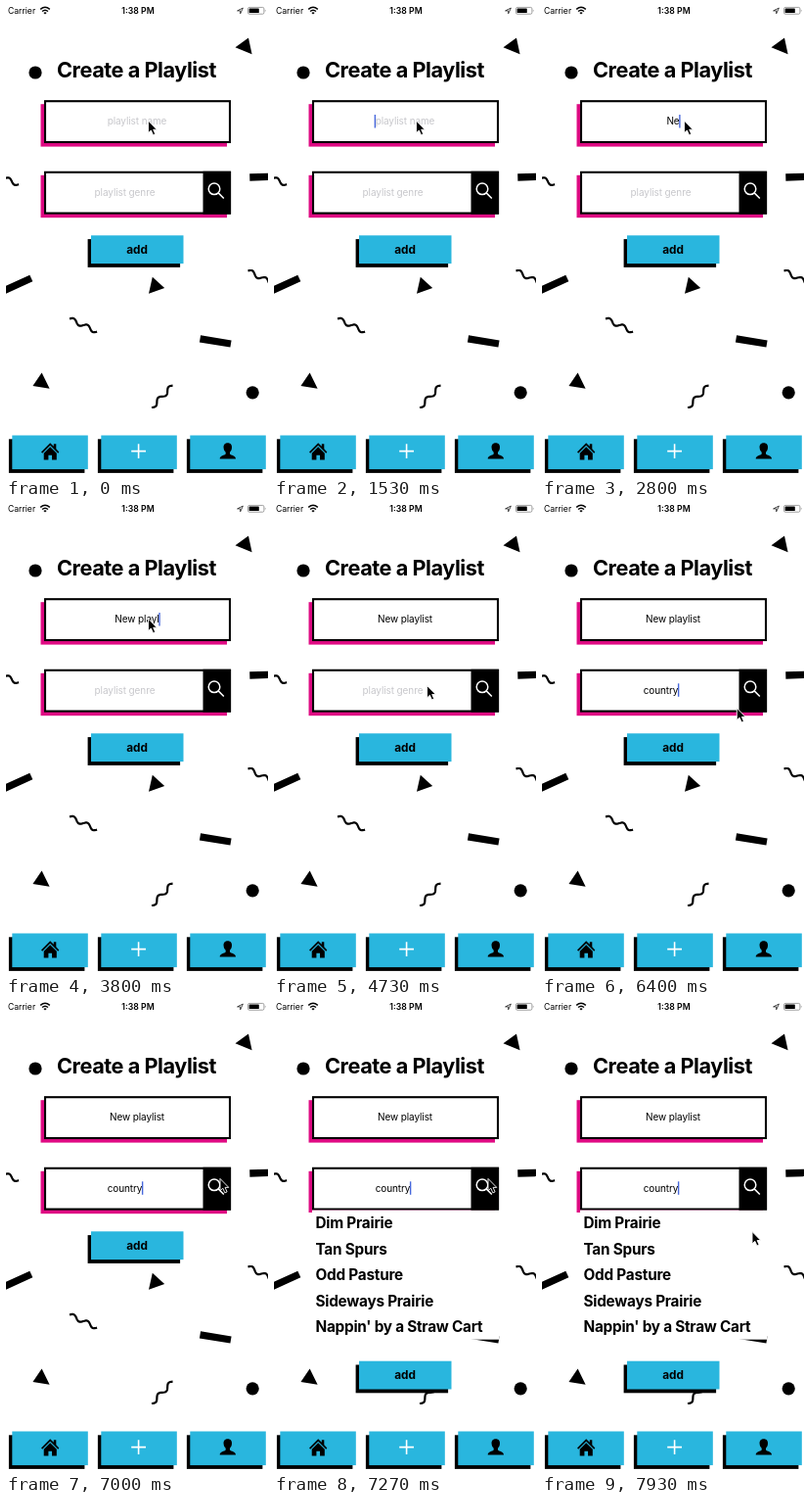
Recreate the animation shown at these times as an HTML page. Size 268 by 480 pixels, loop 8000 ms.

```html
<!DOCTYPE html>
<html lang="en">
<head>
<meta charset="utf-8">
<title>Create a Playlist</title>
<style>
  html, body { margin: 0; width: 100%; height: 100%; overflow: hidden; background: #fff; }
  svg { display: block; width: 100%; height: 100%; }
  text { font-family: Inter, "Liberation Sans", sans-serif; }
  .mid { text-anchor: middle; }
  .title { font-size: 21.7px; font-weight: 700; letter-spacing: -.021em; }
  .field { font-size: 10px; letter-spacing: -.01em; text-anchor: middle; }
  .list { font-size: 15.3px; font-weight: 700; letter-spacing: -.015em; }
  .line { fill: none; stroke: #000; stroke-width: 2.2; }
  .caret { fill: #4868dc; }
  .cyan { fill: #29b6de; }
  .pink { fill: #df0a83; }
  .box { fill: #fff; stroke: #000; stroke-width: 2.1; }
</style>
</head>
<body>
<svg viewBox="0 0 268 480">
  <g id="status">
    <text x="2" y="7.7" font-size="8.6">Carrier</text>
    <path d="M35.2 3.4q4.8-4.2 9.6 0M37 5.5q3-2.6 6 0" fill="none" stroke="#000" stroke-width="1.4"/>
    <path d="M38.4 6.9q1.6-1.3 3.2 0L40 8.6Z"/>
    <text class="mid" x="135" y="7.8" font-size="8.7" font-weight="600">1:38 PM</text>
    <path d="M236.6 4.9L242.4 2L239.7 7.8V4.9Z" fill="none" stroke="#000" stroke-width=".7"/>
    <rect x="247.5" y="1.4" width="16.4" height="6.8" rx="1.4" fill="none" stroke="#777" stroke-width=".7"/>
    <rect x="248.6" y="2.5" width="10.2" height="4.6" rx=".6"/>
    <path d="M264.9 3.6q1.3 1.2 0 2.4Z" fill="#777"/>
  </g>

  <g id="confetti">
    <circle cx="30" cy="68" r="6.6"/>
    <circle cx="252.2" cy="394.8" r="6.6"/>
    <path d="M234.5 42.3L248 32.5L251.6 49.3ZM149.8 276.8L162.2 288L146 293.8ZM36.6 374.5L44.6 390.7L27.4 388Z"/>
    <path d="M-5 292L25.8 278M249.3 175L270 174.4M198.5 339.8L230 345" stroke="#000" stroke-width="7.3"/>
    <g id="squiggles"></g>
  </g>

  <text class="title mid" x="133.5" y="72.7">Create a Playlist</text>

  <g id="inputs"></g>
  <rect id="panel" x="35" y="215" width="195.5" height="129.7" fill="#fff"/>
  <rect id="shade" x="39" y="212.6" width="191.5" height="4" fill="#fff"/>
  <rect x="201.5" y="168.8" width="28.6" height="43.8"/>
  <path d="M217.2 190.9L222.8 196.5M218.8 186.8a5.8 5.8 0 1 0-11.6 0a5.8 5.8 0 1 0 11.6 0" fill="none" stroke="#fff" stroke-width="1.5"/>

  <g id="list" class="list"></g>
  <g id="add"></g>
  <g id="tabs"></g>
  <g id="icons">
    <path d="M36 455.6L45.2 446.3L48.8 449.8V447.3H51.3V452.3L54.3 455.6L53.2 456.7L45.2 448.7L37.2 456.7ZM38.7 456.8L45.2 450.2L51.8 456.8V463.6H47V458.8H43.4V463.6H38.7Z"/>
    <path d="M128.2 454.6H143M135.6 447.2V462" stroke="#fff" stroke-width="1.6"/>
    <path d="M226.8 446.3C230 446.3 231.3 448.5 231 451.3C230.8 453.5 230 454.6 229 455.8V457.5C230 458.9 235 459 235 462.5H218.7C218.7 459 223.7 458.9 224.7 457.5V455.8C223.6 454.6 222.8 453.5 222.6 451.3C222.3 448.5 223.6 446.3 226.8 446.3Z"/>
  </g>

  <text class="field" id="nameText" y="121.2"></text>
  <rect class="caret" id="nameCaret" y="111" width="1.4" height="13.5"/>
  <text class="field" id="genreText" y="193.8"></text>
  <rect class="caret" id="genreCaret" y="183.3" width="1.4" height="13.5"/>

  <path id="cursor" d="M0 0V12.4L2.8 9.8L4.9 14.5L7.1 13.5L5.1 9H8.8Z" stroke="#fff" stroke-width=".9"/>
</svg>

<script>
const LOOP = 8000;
const LIST_OPEN = 7070;
const LIST_SHIFT = 132.4;
const KEY_GAP = 65;
const SPACE = 2.8;
const BLINK = { period: 950, hold: 540, fade: 200 };

const $ = id => document.getElementById(id);
const clamp = v => Math.min(1, Math.max(0, v));
const rect = (cls, x, y, w, h) =>
  `<rect class="${cls}" x="${x}" y="${y}" width="${w}" height="${h}"/>`;

// Cyan block with a black shadow to the lower left
const raised = (x, y, w, h) => rect("", x - 3.4, y + 3.8, w, h) + rect("cyan", x, y, w, h);

const input = y => rect("pink", 35.5, y + 3, 190.5, 43.4) + rect("box", 40, y, 189, 41.8);

// Two sine periods along a tilted axis
function squiggle(x, y, angle, amplitude) {
  const points = Array.from({ length: 33 }, (_, i) =>
    `${i * 31 / 32} ${-amplitude * Math.sin(i * Math.PI / 8)}`);
  return `<path class="line" transform="translate(${x} ${y}) rotate(${angle})" d="M${points.join("L")}"/>`;
}

const songs = ["Dim Prairie", "Tan Spurs", "Odd Pasture", "Sideways Prairie", "Nappin' by a Straw Cart"];
$("list").innerHTML = songs.map((s, i) => `<text x="42.5" y="${231.3 + 26.4 * i}">${s}</text>`).join("");
$("squiggles").innerHTML = squiggle(65, 319.5, 25, 2.2) + squiggle(-15.5, 170, 23, 2.2) +
  squiggle(247.5, 270.5, 27, 2.2) + squiggle(149, 410, -46, -2.2);
$("inputs").innerHTML = [97.2, 169.8].map(input).join("");
$("tabs").innerHTML = [0, 1, 2].map(i => raised(6.3 + 91 * i, 438.5, 77.5, 34.6)).join("");
$("add").innerHTML = raised(87, 234.3, 94.5, 28.8) +
  `<text class="mid" x="134" y="252.9" font-size="11.8" font-weight="700">add</text>`;

// Typing comes in bursts of evenly spaced keys
const fields = [
  {
    id: "name", center: 134, hint: "playlist name", focus: 1530, blur: 4500,
    bursts: [[2730, "New"], [3070, " "], [3270, "pl"], [3670, "aylist"]]
  },
  {
    id: "genre", center: 121.5, hint: "playlist genre", focus: 5070, blur: LOOP,
    bursts: [[5600, "c"], [5800, "ou"], [6070, "nt"], [6270, "ry"]]
  }
];

const home = [145.6, 117.2];
const moves = [
  { from: 4400, to: 4870, bend: [155, 155], end: [157, 192] },
  { from: 6330, to: 6800, bend: [250, 235], end: [219, 180.4] },
  { from: 7470, to: 7930, bend: [252, 216], end: [215, 234.5] }
];

function typedAt(bursts, t) {
  return bursts.map(([start, text]) =>
    t < start ? "" : text.slice(0, 1 + Math.floor((t - start) / KEY_GAP))).join("");
}

function caretOpacity({ focus, blur, bursts }, t) {
  if (t < focus || t >= blur) return 0;
  if (bursts.some(([start]) => t >= start && t < start + 400)) return 1;
  const phase = (t - focus) % BLINK.period;
  return 1 - clamp((phase - BLINK.hold) / BLINK.fade);
}

function drawField(field, t) {
  const { id, center, hint, bursts } = field;
  const raw = typedAt(bursts, t);
  const shown = raw.trimEnd();
  const text = $(id + "Text"), caret = $(id + "Caret");
  text.textContent = shown || hint;
  text.setAttribute("x", center);
  text.setAttribute("fill", shown ? "#000" : "#c7c7cb");
  const half = text.getComputedTextLength() / 2;
  const edge = shown ? half + (raw.length - shown.length) * SPACE : -half - .6;
  caret.setAttribute("x", center + edge - .4);
  caret.setAttribute("opacity", caretOpacity(field, t));
}

// Each move follows a quadratic curve and slows towards its end
function cursorAt(t) {
  return moves.reduce((start, { from, to, bend, end }) => {
    const k = 1 - (1 - clamp((t - from) / (to - from))) ** 2;
    return start.map((v, i) => (1 - k) ** 2 * v + 2 * k * (1 - k) * bend[i] + k * k * end[i]);
  }, home);
}

function draw(t) {
  const open = t >= LIST_OPEN;
  fields.forEach(field => drawField(field, t));
  for (const id of ["panel", "shade", "list"]) $(id).setAttribute("visibility", open ? "visible" : "hidden");
  $("add").setAttribute("transform", `translate(0 ${open ? LIST_SHIFT : 0})`);
  $("cursor").setAttribute("transform", `translate(${cursorAt(t)})`);
}

const start = performance.now();
function tick() {
  draw((performance.now() - start) % LOOP);
  requestAnimationFrame(tick);
}
tick();
</script>
</body>
</html>
```
